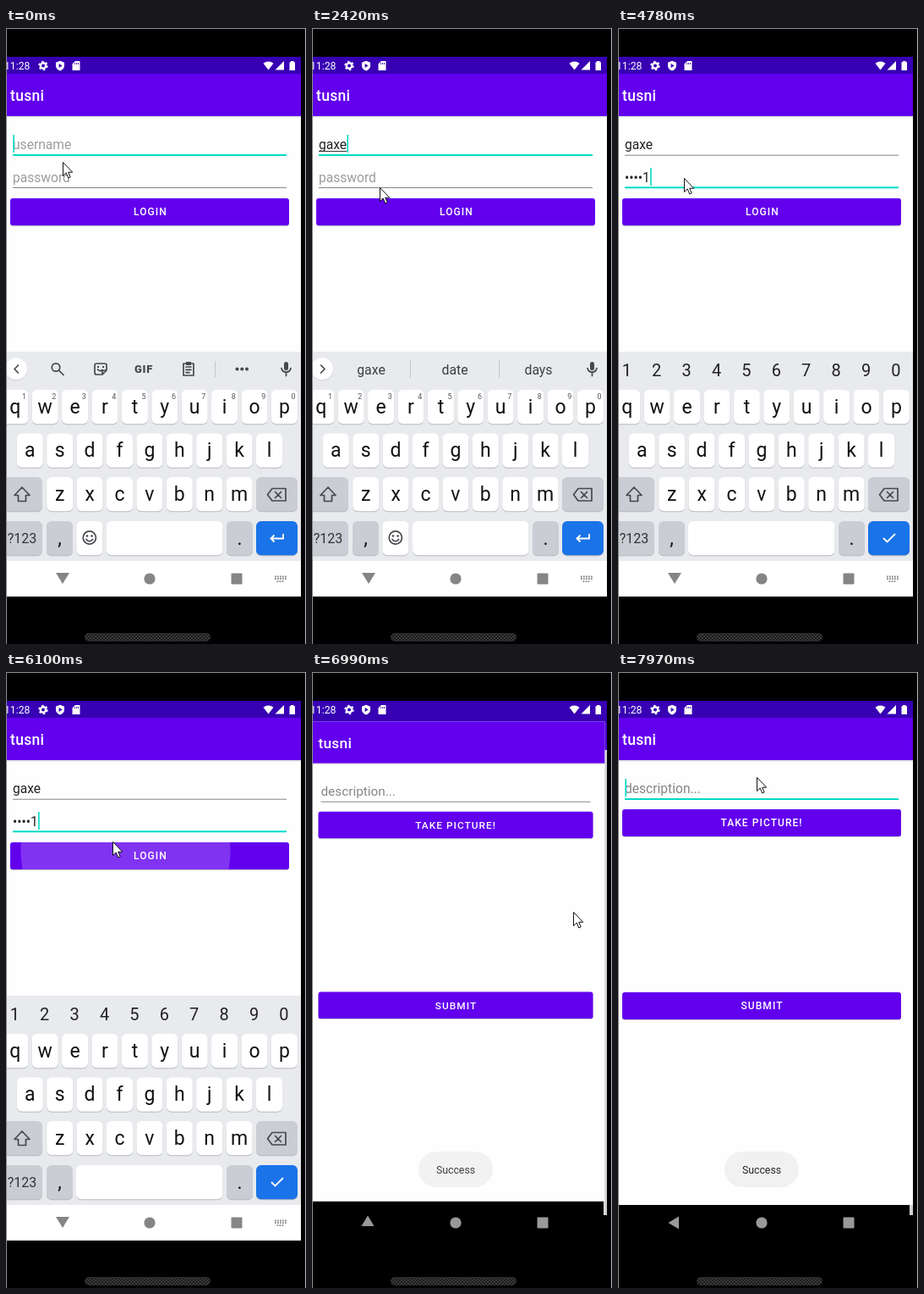
Write an HTML page that moves like this. It is 355 by 727 pixels and loops after 8 s.

```html
<!DOCTYPE html>
<html lang="en">
<head>
<meta charset="utf-8">
<title>Login and post</title>
<style>
  html, body { margin: 0; width: 100%; height: 100%; overflow: hidden; background: #000; }
  svg { display: block; width: 355px; height: 727px; font-family: Roboto, sans-serif; }
  .title { font: 500 17.5px Roboto, sans-serif; letter-spacing: .3px; fill: #fff; }
  .field { font-size: 15.6px; fill: #222; }
  .hint { font-size: 15.6px; fill: #9c9c9c; }
  .btn { font: 500 12px Roboto, sans-serif; letter-spacing: 1.07px; fill: #fff; }
  .mid { text-anchor: middle; }
  .key { font-size: 23px; fill: #111; text-anchor: middle; }
  .num { font-size: 9px; fill: #555; text-anchor: middle; }
  .digit { font-size: 20px; fill: #222; text-anchor: middle; }
  .word { font-size: 15.8px; fill: #3c4043; text-anchor: middle; }
  .icon { fill: none; stroke: #45484d; stroke-width: 1.7; stroke-linejoin: round; stroke-linecap: round; }
  .solid { fill: #45484d; stroke: none; }
  .caret, .on { fill: #03dac5; }
  .off { fill: #858585; }
</style>
</head>
<body>
<svg viewBox="0 0 355 727">
  <defs>
    <clipPath id="screen"><rect x="1" y="34" width="348" height="637"/></clipPath>
    <clipPath id="loginClip"><rect x="5" y="201" width="330" height="32" rx="3"/></clipPath>
    <pattern id="mesh" width="4" height="4" patternUnits="userSpaceOnUse">
      <rect width="4" height="4" fill="#1c1c1c"/>
      <path d="M0 0L4 4M4 0L0 4" stroke="#484848" stroke-width=".7"/>
    </pattern>
  </defs>

  <rect width="355" height="727" fill="#000"/>
  <path d="M0 .5H355M.5 0V727" stroke="#8c8c8c"/>
  <path d="M354.5 0V727" stroke="#b8b8b8"/>
  <rect x="93" y="714" width="149" height="10" rx="5" fill="url(#mesh)"/>

  <g clip-path="url(#screen)">
    <g id="login">
      <rect y="54" width="349" height="617" fill="#fefefe"/>
      <rect y="104" width="349" height="1.5" fill="#000" opacity=".12"/>
      <rect y="54" width="349" height="50" fill="#6200ee"/>
      <text class="title" x="5" y="86">tusni</text>

      <text id="userHint" class="hint" x="8" y="143">username</text>
      <text id="user" class="field" x="8" y="143"></text>
      <rect id="compose" x="8" y="145" height="1" fill="#333"/>
      <rect id="userLine" x="8" width="324"/>
      <text id="passHint" class="hint" x="8" y="182">password</text>
      <text id="pass" class="field" x="8" y="182"></text>
      <rect id="passLine" x="8" width="324"/>
      <rect id="caret" class="caret" width="1.6" height="21"/>

      <rect x="5" y="202" width="330" height="32.3" rx="3" fill="#000" opacity=".2"/>
      <rect x="5" y="201" width="330" height="32" rx="3" fill="#6200ee"/>
      <circle id="ripple" cy="211" fill="#fff" clip-path="url(#loginClip)"/>
      <text class="btn" x="151" y="221.3">LOGIN</text>

      <rect y="382" width="349" height="247" fill="#e8eaed"/>
      <g id="keys"></g>

      <g id="bar">
        <circle cx="12" cy="403" r="13.2" fill="#000" opacity=".13"/>
        <circle cx="12" cy="402.3" r="13" fill="#fff"/>
        <path id="chevron" class="icon"/>
        <g id="tools">
          <circle class="icon" cx="59" cy="400.5" r="4.7"/>
          <path class="icon" d="M62.7 404.2L68 409.5"/>
          <path class="icon" d="M107 396H117Q119 396 119 398V404L114 409H107Q105 409 105 407V398Q105 396 107 396ZM119 404H116Q114 404 114 406V409M108.5 403Q111 406 114 403.5"/>
          <path class="solid" d="M108 399h2v2h-2zM114 399h2v2h-2z"/>
          <text class="mid" x="163" y="406.5" font-size="13" font-weight="800" letter-spacing=".7" fill="#45484d">GIF</text>
          <path class="icon" d="M210 396H222V410H210ZM213 400H219M213 403.3H219M213 406.6H217"/>
          <path class="solid" d="M213 394h6v4h-6z"/>
          <path d="M247.5 393V412" stroke="#c3c6ca"/>
          <circle class="solid" cx="273.5" cy="402.5" r="2"/>
          <circle class="solid" cx="279.3" cy="402.5" r="2"/>
          <circle class="solid" cx="285" cy="402.5" r="2"/>
        </g>
        <g id="words">
          <path d="M116.5 392V413M221.5 392V413" stroke="#c3c6ca"/>
          <text id="guess" class="word" x="70" y="408.5"></text>
          <text class="word" x="169" y="408.5">date</text>
          <text class="word" x="268" y="408.5">days</text>
        </g>
        <rect class="solid" x="329" y="394" width="5" height="10" rx="2.5"/>
        <path class="icon" d="M326 401.5A5.6 5.6 0 0 0 337 401.5M331.5 407V410.5"/>
      </g>
      <g id="digits"></g>

      <rect y="629" width="349" height="42" fill="#fff"/>
      <g fill="#858585">
        <path d="M59 643H75L67 656Z"/>
        <circle cx="170" cy="650" r="6.6"/>
        <rect x="266.5" y="643.5" width="13" height="13" rx="1"/>
        <path d="M318 647.5H332M318 650.2H332M320.5 653.2H329.5" fill="none" stroke="#858585" stroke-width="1.8" stroke-dasharray="1.8 1.2"/>
      </g>
    </g>

    <g id="post">
      <rect y="54" width="349" height="617" fill="#000"/>
      <rect y="34" width="349" height="58" fill="#5200cf"/>
      <rect x="345" y="92" width="4" height="549" fill="#d3d3d6"/>
      <rect y="34" width="349" height="26" fill="#3700b3"/>
      <g id="page">
        <rect x="-9" y="54" width="358" height="575" fill="#fefefe"/>
        <rect x="-9" y="104" width="358" height="1.5" fill="#000" opacity=".12"/>
        <rect x="-9" y="54" width="358" height="50" fill="#6200ee"/>
        <text class="title" x="5" y="86">tusni</text>
        <text class="hint" x="8" y="143" style="fill:#858585">description...</text>
        <rect id="postLine" x="8" width="324"/>
        <rect id="postCaret" class="caret" x="8.4" y="126" width="1.6" height="21"/>
        <rect x="5" y="163" width="330" height="32" rx="3" fill="#000" opacity=".2"/>
        <rect x="5" y="162" width="330" height="32" rx="3" fill="#6200ee"/>
        <text class="btn" x="121.5" y="182.3">TAKE PICTURE!</text>
        <rect x="5" y="379" width="330" height="32" rx="3" fill="#000" opacity=".2"/>
        <rect x="5" y="378" width="330" height="32" rx="3" fill="#6200ee"/>
        <text class="btn" x="145.5" y="398.3">SUBMIT</text>
      </g>
      <g fill="#999">
        <path id="back" d="M59.5 650L72 642.5V657.5Z"/>
        <circle cx="170" cy="650" r="6.6"/>
        <rect x="266.5" y="643.5" width="13" height="13" rx="1"/>
      </g>
    </g>

    <rect y="34" width="349" height="20" fill="#3700b3"/>
    <g fill="#fff">
      <text x="28.5" y="49" font-size="12.3" text-anchor="end">11:28</text>
      <circle cx="44" cy="44.5" r="3.2" fill="none" stroke="#fff" stroke-width="2.4"/>
      <circle cx="44" cy="44.5" r="4.8" fill="none" stroke="#fff" stroke-width="1.8" stroke-dasharray="2.4 2.63"/>
      <path d="M64 38.8L69 40.8V44.5Q69 48.7 64 50.4Q59 48.7 59 44.5V40.8Z"/>
      <path d="M62.6 42L66.6 44.5L62.6 47Z" fill="#3700b3"/>
      <path d="M82 39H87.5V50H78.5V42.5Z"/>
      <path d="M81.5 41.3V43M83.5 41V43M85.5 41V43" stroke="#3700b3" stroke-width=".9"/>
      <path d="M304.5 41.8Q310.5 37 316.5 41.8L310.5 49.5Z"/>
      <path d="M329 39V49.5H318.5Z"/>
      <path d="M337 39H340.5V40.2H342V50H335.5V40.2H337Z"/>
    </g>

    <g id="toast">
      <rect x="126" y="566" width="88" height="42" rx="21" fill="#f1f1f1"/>
      <text class="mid" x="170" y="591.8" font-size="12.3" fill="#262626">Success</text>
    </g>
  </g>

  <path id="mouse" d="M.5.5V16.6L4.2 13L6.8 19L9.2 17.9L6.7 12.2H11.7Z" fill="#fff" stroke="#111" stroke-width="1"/>
</svg>

<script>
const NAME = 'gaxe', LOOP = 8000, PITCH = 35.4;
const $ = id => document.getElementById(id);
const set = (id, attrs) => { for (const k in attrs) $(id).setAttribute(k, attrs[k]); };
const show = (id, on) => { $(id).style.display = on ? '' : 'none'; };

// Keyboard
const GREY = '#cacdd3', WHITE = '#fff';
const key = (x, y, w, fill = WHITE, id = '') =>
  `<rect x="${x}" y="${y + 1.3}" width="${w}" height="40" rx="6" fill="#9b9fa5" opacity=".65"/>` +
  `<rect ${id && `id="${id}"`} x="${x}" y="${y}" width="${w}" height="40.3" rx="6" fill="${fill}"/>`;
const label = (cls, x, y, s) => `<text class="${cls}" x="${x}" y="${y}">${s}</text>`;
const row = (chars, x0, y) => [...chars].map((c, i) => {
  const x = x0 + i * PITCH;
  return key(x - 15.5, y, 31) + label('key', x, y + 27.5, c);
}).join('');
const tenDigits = (cls, x0, y) =>
  [...'1234567890'].map((d, i) => label(cls, x0 + i * PITCH, y, d)).join('');

$('keys').innerHTML =
  row('qwertyuiop', 10.8, 427) + row('asdfghjkl', 28.3, 478.5) + row('zxcvbnm', 63.7, 530) +
  `<g id="hints">${tenDigits('num', 21.5, 437.5)}</g>` +
  key(-6, 530, 49, GREY) + key(296, 530, 49, GREY) +
  '<path class="icon" d="M19 542L28 551.5H23.5V558.5H14.5V551.5H10Z"/>' +
  '<path class="icon" d="M315 543.5H331V558H315L309.5 550.7ZM318.5 547.5L325.5 554.5M325.5 547.5L318.5 554.5"/>' +
  key(-6, 582, 49, GREY) + label('mid" font-size="16" fill="#333', 19, 607.5, '?123') +
  key(48, 582, 31, GREY) + label('key', 63.5, 610, ',') +
  `<g id="wide">${key(83, 582, 173.5)}</g><g id="narrow">${key(83.3, 582, 31) + key(119, 582, 137.5)}
    <circle class="icon" cx="98.8" cy="601.5" r="7.6"/>
    <circle class="solid" cx="96" cy="599.5" r="1.3"/><circle class="solid" cx="101.6" cy="599.5" r="1.3"/>
    <path class="icon" d="M95 603.5Q98.8 608 102.6 603.5"/></g>` +
  key(261, 582, 31, GREY) + label('key', 276.5, 610, '.') +
  key(296, 582, 49, '#1a73e8') +
  '<path id="enter" fill="none" stroke="#fff" stroke-width="1.8"/>';
$('digits').innerHTML = tenDigits('digit', 10.3, 410.5);

// Each track holds its value until the next time
const at = (track, t) => {
  let v = track[0][1];
  for (const [time, val] of track) if (t >= time) v = val;
  return v;
};

const mouse = [
  [0, [67, 158]], [2150, [70, 168]], [2290, [77, 182]], [2420, [80, 188]],
  [2700, [79, 180]], [2850, [78, 177]], [5370, [104, 189]], [5530, [126, 200]],
  [6710, [204, 207]], [6840, [286, 216]], [6990, [309, 283]], [7140, [299, 248]],
  [7280, [263, 206]], [7420, [218, 164]], [7560, [183, 136]], [7700, [166, 125]], [7820, [164, 124]]
];
const typed = [[0, 0], [440, 1], [730, 2], [870, 3], [1160, 4]];
const secret = [[0, 0], [3600, 1], [3890, 2], [4040, 3], [4350, 4], [4780, 5]];
const blink = [[0, 1], [1720, 0], [2150, 1], [5370, 0], [5820, 1], [6410, 0], [6710, 1]];
const ripple = [[0, [141, 0, 0]], [6100, [141.5, 124, .2]], [6250, [160, 180, .12]], [6410, [170, 0, 0]]];
const toast = [[0, 0], [6840, .3], [6990, .88], [7140, 1]];
const zoom = [[0, .985], [7140, .998], [7280, 1]];

const line = (id, y, on) =>
  set(id, { class: on ? 'on' : 'off', y: on ? y - 1 : y - .3, height: on ? 2 : 1 });

function draw(t) {
  const onPass = t >= 2850, numeric = t >= 3140, posted = t >= 6990;
  const n = at(typed, t), k = at(secret, t);
  const user = NAME.slice(0, n);
  const pass = t < 6410 && k ? '•'.repeat(k - 1) + '1' : '•'.repeat(k);

  $('user').textContent = user;
  $('guess').textContent = user;
  $('pass').textContent = pass;
  show('login', !posted);
  show('post', posted);
  show('userHint', !n);
  show('passHint', !k);
  line('userLine', 150, !onPass);
  line('passLine', 188.3, onPass);

  if (!posted) {
    const userW = n ? $('user').getComputedTextLength() : 0;
    const passW = k ? $('pass').getComputedTextLength() : 0;
    show('compose', n && !onPass);
    set('compose', { width: userW });
    show('caret', at(blink, t));
    set('caret', { x: 8.3 + (onPass ? passW : userW), y: onPass ? 165 : 126 });
  }

  const suggest = t >= 580;
  show('tools', !suggest);
  show('words', suggest);
  set('chevron', { d: suggest ? 'M10.5 398L15 402.5L10.5 407' : 'M14.5 398L10 402.5L14.5 407' });
  show('bar', !numeric);
  show('hints', !numeric);
  show('narrow', !numeric);
  show('digits', numeric);
  show('wide', numeric);
  set('enter', { d: numeric ? 'M314 602L318.5 606.5L328 597' : 'M328 597V602.5H313.5M317.5 598.5L313.5 602.5L317.5 606.5' });

  const [cx, r, alpha] = at(ripple, t);
  set('ripple', { cx, r, opacity: alpha });
  show('toast', at(toast, t));
  set('toast', { opacity: at(toast, t) });

  set('page', { transform: `translate(170 350) scale(${at(zoom, t)}) translate(-170 -350)` });
  set('back', { transform: t < 7140 ? 'rotate(90 67 649)' : '' });
  line('postLine', 150, t >= 7820);
  show('postCaret', t >= 7820);

  set('mouse', { transform: `translate(${at(mouse, t)})` });
}

const start = performance.now();
function tick(now) {
  draw(Math.max(0, now - start) % LOOP);
  requestAnimationFrame(tick);
}
draw(0);
requestAnimationFrame(tick);
</script>
</body>
</html>
```
